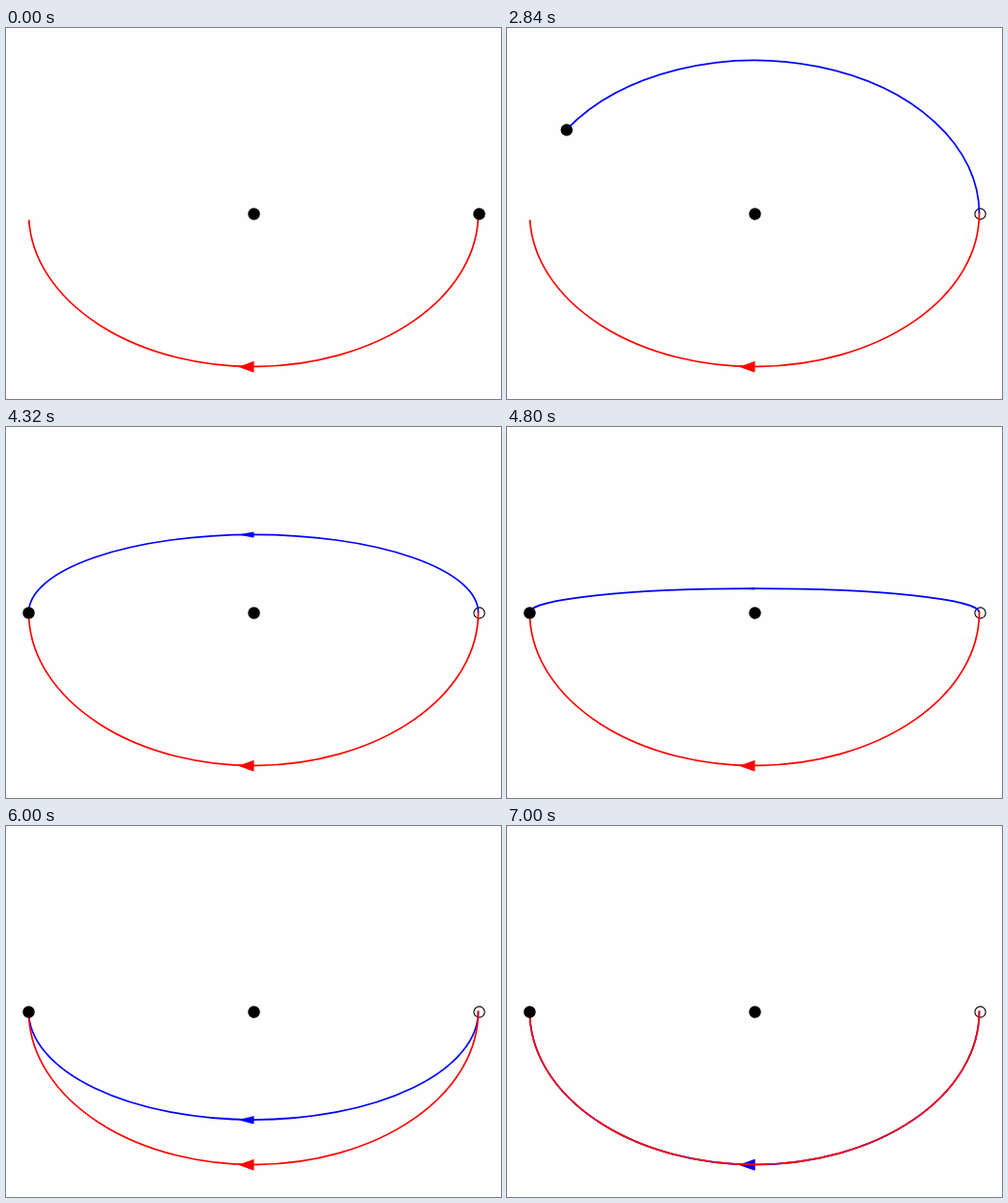
These frames come from a looping animation (512 by 384 pixels, 8 s). An HTML page:

```html
<!DOCTYPE html>
<html lang="en">
<head>
<meta charset="utf-8">
<title>Half-ellipse homotopy</title>
<style>
  html, body { margin: 0; width: 100%; height: 100%; overflow: hidden; background: #fefefe; }
  svg { display: block; width: 100%; height: 100%; }
  .curve { fill: none; stroke-width: 1.7; }
</style>
</head>
<body>
<svg viewBox="0 0 512 384">
  <circle id="start" cx="489.5" cy="192.5" r="5.6" fill="none" stroke="#000" stroke-width="1.1"/>
  <path id="redArrow" fill="#f00"/>
  <path id="blue" class="curve" stroke="#00f"/>
  <path id="blueArrow" fill="#00f"/>
  <path id="red" class="curve" stroke="#f00"/>
  <circle cx="256.5" cy="192.5" r="6.2"/>
  <circle id="dot" r="6.2"/>
</svg>
<script>
const CX = 256, CY = 192, RX = 232.5, RY = 158.5;
const LOOP = 8000, STEP = 20;
const $ = id => document.getElementById(id);
const clamp = v => Math.min(1, Math.max(0, v));

// Arc from the right end to (x, y); positive ry bulges upwards.
const arc = (ry, x, y) =>
  `M${CX + RX} ${CY}A${RX} ${Math.abs(ry)} 0 0 ${ry < 0 ? 1 : 0} ${x} ${y}`;

// Arrowhead on the middle of the curve, flattened along with it.
function arrow(ry) {
  const y = CY - ry + 0.2, h = 5.7 * Math.abs(ry) / RY + 0.2;
  return `M240 ${y}L256.5 ${y - h}V${y + h}Z`;
}

$('red').setAttribute('d', `M488.5 191V192` + arc(-RY, 23.7, 198.5).replace('M', 'L'));
$('redArrow').setAttribute('d', arrow(-RY));

function draw(time) {
  const t = Math.floor(time % LOOP / STEP) * STEP;
  const trace = clamp((t - 1004) / 2000);
  const turn = clamp((t - 3000) / 4000);
  const c = 1 - 2 * trace;
  const s = Math.sqrt(1 - c * c);
  const ry = RY * Math.cos(Math.PI * turn);

  $('start').style.display = trace > 0 ? '' : 'none';
  $('blue').setAttribute('d', trace > 0 ? arc(ry, CX + RX * c, CY - RY * s) : '');
  $('blueArrow').setAttribute('d', trace === 1 ? arrow(ry) : '');
  $('dot').setAttribute('cx', CX + 0.5 + 233 * c);
  $('dot').setAttribute('cy', CY + 0.5 - RY * s);
}

function tick() {
  draw(performance.now());
  requestAnimationFrame(tick);
}
tick();
</script>
</body>
</html>
```
